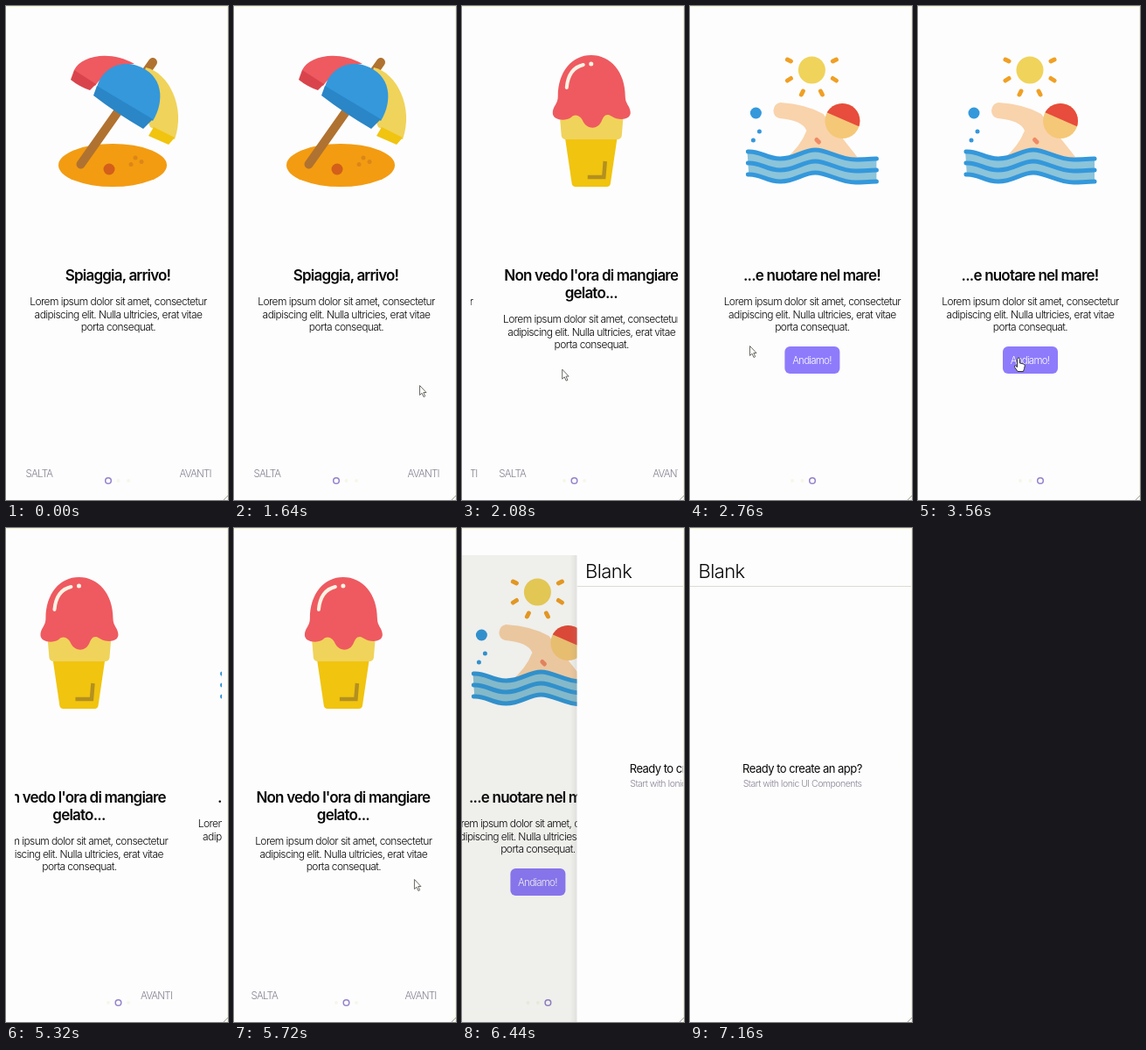
Recreate the animation shown at these times as an HTML page. Size 254 px wide and 563 px high, loop 7200 ms.

```html
<!DOCTYPE html>
<html lang="it">
<head>
<meta charset="utf-8">
<title>Spiaggia</title>
<style>
  html, body { margin: 0; width: 100%; height: 100%; overflow: hidden; background: #fdfdfe; }
  svg { display: block; width: 254px; height: 563px; }
  text { font-family: Inter, "Liberation Sans", sans-serif; fill: #080808; }
  .mid { text-anchor: middle; }
  .title { font-size: 17px; font-weight: 600; letter-spacing: -.8px; }
  .body { font-size: 12px; font-weight: 300; letter-spacing: -.56px; }
  .nav { font-size: 11.5px; font-weight: 300; letter-spacing: -.75px; fill: #85808f; }
  .label { font-size: 11.5px; font-weight: 300; letter-spacing: -.75px; fill: #fff; }
  .head { font-size: 22px; font-weight: 300; letter-spacing: -.6px; }
  .ready { font-size: 13px; font-weight: 400; letter-spacing: -.52px; }
  .start { font-size: 10.5px; font-weight: 300; letter-spacing: -.52px; fill: #8b8494; }
  #tint { mix-blend-mode: multiply; }
</style>
</head>
<body>
<svg viewBox="0 0 254 563">
  <defs>
    <clipPath id="frame"><rect x="10" y="30" width="237" height="533"/></clipPath>
    <clipPath id="skull"><circle cx="163" cy="131" r="20"/></clipPath>
    <linearGradient id="edge"><stop stop-color="#888" stop-opacity="0"/><stop offset="1" stop-color="#888" stop-opacity=".15"/></linearGradient>
  </defs>
  <rect width="254" height="563" fill="#fdfdfe"/>

  <g id="tour">
    <g clip-path="url(#frame)">
      <g id="strip">
        <g class="slide">
          <ellipse cx="122" cy="181.500" rx="62" ry="24.500" fill="#f39c12"/>
          <g fill="#dc8618"><circle cx="148" cy="173" r="2.500"/><circle cx="143" cy="180.500" r="2.500"/><circle cx="155" cy="177.500" r="2.500"/></g>
          <circle cx="118" cy="186" r="6.500" fill="#d35f1a"/>
          <path d="M85.500 180.500L168 64" stroke="#b07230" stroke-width="10" stroke-linecap="round"/>
          <path d="M160 70C186 76 206 115 193 152L165 138L150 100z" fill="#f0d35a"/>
          <path d="M169 138L193 150L186 158L163 148z" fill="#f1c40f"/>
          <path d="M78 73C86 56 120 50 147 66C125 68 110 80 102 91L78 76z" fill="#ee5a60"/>
          <path d="M78 73L103 89L96 96Q84 92 74 84z" fill="#d9444c"/>
          <path d="M104 92C111 70 131 62 150 68C180 78 182 108 168 131z" fill="#3498db"/>
          <path d="M104 91L168 129L157 140Q126 122 100 102z" fill="#2a86c6"/>
        </g>
        <g class="slide">
          <path d="M98 149H158L150 203Q149 206 146 206H110Q107 206 106 203z" fill="#f1c40f"/>
          <path d="M92 124H165L163 148Q162 152 158 152H99Q95 152 94 148z" fill="#f0d35a"/>
          <path d="M144 177L142.500 195H124" fill="none" stroke="#b39020" stroke-width="4.500"/>
          <path d="M84 122C84 114 90 112 90 103C90 75 106 56 128 56C150 56 167 75 167 103C167 112 173 114 173 122C172 131 158 130 152 126C145 121 142 126 140 131C136 141 124 141 119 132C116 125 110 122 105 127C98 132 84 130 84 122z" fill="#ee5a60"/>
          <path d="M100 93Q102 71 119 67" fill="none" stroke="#fff3e4" stroke-width="4" stroke-linecap="round"/>
          <circle cx="128" cy="66" r="2.500" fill="#fff3e4"/>
        </g>
        <g class="slide">
          <circle cx="128" cy="73" r="15.500" fill="#f0d35a"/>
          <g stroke="#f0a024" stroke-width="5" stroke-linecap="round">
            <path d="M100 61L104 63M100 85L104 82.500M118 97L116 101M138 97L140 101M152 82.500L156 85M152 63L156 61"/>
          </g>
          <path d="M92 110Q122 112 141 123L180 172L160 180L98 174Q115 160 122 142Q117 130 91 128Q84 126 84 119Q85 111 92 110z" fill="#f9d3ab"/>
          <path d="M133.500 152.500L136 155" stroke="#ee8a66" stroke-width="5" stroke-linecap="round"/>
          <g clip-path="url(#skull)">
            <rect x="140" y="108" width="46" height="46" fill="#f5c878"/>
            <path d="M140 119L188 140V105H140z" fill="#e74c3c"/>
          </g>
          <g fill="#3498db"><circle cx="64" cy="122" r="6.500"/><circle cx="68" cy="143" r="2.500"/><circle cx="61" cy="153" r="2.500"/></g>
          <g id="sea" fill="none"></g>
          <rect x="97" y="388" width="63" height="31" rx="6" fill="#8e7bfc"/>
          <text class="label mid" x="128" y="408">Andiamo!</text>
        </g>
      </g>
    </g>
    <g id="dots"></g>
  </g>
  <rect id="tint" y="31" height="532" fill="#e2e2da"/>

  <g id="blank">
    <rect id="shade" x="-8" y="31" width="8" height="532" fill="url(#edge)"/>
    <rect y="2" width="254" height="561" fill="#fdfdfe"/>
    <path d="M0 66.500H254" stroke="#dcdcd6"/>
    <text class="head" x="9.500" y="57">Blank</text>
    <text class="ready mid" x="128.500" y="279">Ready to create an app?</text>
    <text class="start mid" x="128.500" y="295">Start with Ionic UI Components</text>
  </g>

  <path d="M0 .5H254" stroke="#f3f2cf"/>
  <path d="M253.500 0V563" stroke="#f1f0dc"/>
  <path d="M249 563L254 558" stroke="#a0a098"/>

  <g id="mouse">
    <path id="arrow" d="M.5 .5V11.500L3 9.200L5 13.500L6.700 12.700L4.800 8.500H8z" fill="#fff" stroke="#6a6a62"/>
    <path id="hand" d="M-1.500 1.500Q-1.500 0 0 0T1.500 1.500V6L6 7Q7.500 7.500 7.300 9L6.500 12.500L5.500 15.500H-1L-4.500 10.500Q-5 8.500-3.500 9L-1.500 10.500z" fill="#fff" stroke="#333"/>
  </g>
</svg>

<script>
const LOOP = 7200, PITCH = 237, WIDTH = 254, LAST = PITCH * 2;
const $ = id => document.getElementById(id);

function add(parent, tag, attrs, text) {
  const el = document.createElementNS('http://www.w3.org/2000/svg', tag);
  for (const k in attrs) el.setAttribute(k, attrs[k]);
  if (text) el.textContent = text;
  return parent.appendChild(el);
}
const move = (el, x, y = 0) => el.setAttribute('transform', `translate(${x} ${y})`);
const show = (el, on) => el.setAttribute('visibility', on ? 'visible' : 'hidden');

const titles = [
  ['Spiaggia, arrivo!'],
  ["Non vedo l'ora di mangiare", 'gelato...'],
  ['...e nuotare nel mare!']
];
const lorem = [
  'Lorem ipsum dolor sit amet, consectetur',
  'adipiscing elit. Nulla ultricies, erat vitae',
  'porta consequat.'
];

document.querySelectorAll('.slide').forEach((slide, i) => {
  move(slide, i * PITCH);
  titles[i].forEach((line, n) =>
    add(slide, 'text', { class: 'title mid', x: 128, y: 313 + n * 20 }, line));
  const top = 341 + (titles[i].length - 1) * 20;
  lorem.forEach((line, n) =>
    add(slide, 'text', { class: 'body mid', x: 128.5, y: top + n * 14.5 }, line));
  if (i < 2) {
    add(slide, 'text', { class: 'nav', x: 22.5, y: 537 }, 'SALTA');
    add(slide, 'text', { class: 'nav', x: 198.5, y: 537 }, 'AVANTI');
  }
});

// Water: a pale body under three parallel wave lines.
const wave = 'M55 166C70 165 75 174 92 174S118 164 132 164S160 175 178 175S195 174 202 174';
add($('sea'), 'path', { d: wave, stroke: '#8cc4da', 'stroke-width': 26, transform: 'translate(0 13)' });
for (let i = 0; i < 3; i++) {
  add($('sea'), 'path', {
    d: wave, stroke: '#3498db', 'stroke-width': 5,
    'stroke-linecap': 'round', transform: `translate(0 ${i * 13})`
  });
}

const spots = [117, 128.5, 140].map(cx => ({
  off: add($('dots'), 'circle', { cx, cy: 541, r: 2, fill: '#f7f6e8' }),
  on: add($('dots'), 'circle', { cx, cy: 541, r: 3.3, fill: '#fdfdfe', stroke: '#9482cc', 'stroke-width': 1.5 })
}));

const ease = {
  drag: p => p * p * (3 - 2 * p),
  out: p => 1 - (1 - p) ** 3,
  push: p => 1 - (1 - p) ** 4
};

// Rows: time, easing towards this row, values.
function track(rows, t) {
  let prev = rows[0];
  for (const row of rows) {
    if (t < row[0]) {
      const p = ease[row[1]]((t - prev[0]) / (row[0] - prev[0]));
      return row.slice(2).map((v, i) => prev[i + 2] + (v - prev[i + 2]) * p);
    }
    prev = row;
  }
  return prev.slice(2);
}

const scroll = [
  [0, 'drag', 0], [1680, 'drag', 0], [1960, 'drag', 144], [2260, 'out', PITCH],
  [2330, 'drag', PITCH], [2610, 'drag', 381], [2910, 'out', LAST],
  [4200, 'drag', LAST], [5320, 'drag', 282], [5620, 'out', PITCH],
  [5700, 'drag', PITCH], [5940, 'drag', 381], [6200, 'out', LAST]
];
const pointer = [
  [0, 'drag', 258, 470], [1200, 'drag', 258, 470], [1500, 'out', 212, 432],
  [1680, 'drag', 212, 432], [1960, 'drag', 68, 420], [2280, 'drag', 212, 400],
  [2330, 'drag', 212, 400], [2610, 'drag', 68, 387], [2900, 'drag', 68, 387],
  [3300, 'drag', 115, 401], [3800, 'drag', 115, 401], [4150, 'drag', 62, 400],
  [4200, 'drag', 62, 400], [5320, 'drag', 256, 400], [5600, 'drag', 258, 400],
  [5690, 'drag', 212, 400], [5940, 'drag', 68, 400], [6220, 'out', 115, 401]
];
const page = [[0, 'push', WIDTH], [6359, 'push', WIDTH], [6900, 'push', 0]];

function draw(t) {
  const [pos] = track(scroll, t);
  const [x, y] = track(pointer, t);
  const [left] = track(page, t);
  const entered = 1 - left / WIDTH;

  move($('strip'), -pos);
  const active = Math.round(pos / PITCH);
  spots.forEach((s, i) => {
    show(s.on, i === active);
    show(s.off, i !== active);
  });

  move($('tour'), -entered * WIDTH * .34);
  $('tint').setAttribute('width', left);
  $('tint').setAttribute('opacity', entered);
  move($('blank'), left);
  show($('blank'), entered > 0);
  show($('shade'), entered > 0 && left > 0);

  const visible = t < 6359;
  const over = pos === LAST && x > 97 && x < 160 && y > 388 && y < 419;
  move($('mouse'), x, y);
  show($('arrow'), visible && !over);
  show($('hand'), visible && over);
}

const began = performance.now();
function tick() {
  draw((performance.now() - began) % LOOP);
  requestAnimationFrame(tick);
}
tick();
</script>
</body>
</html>
```
